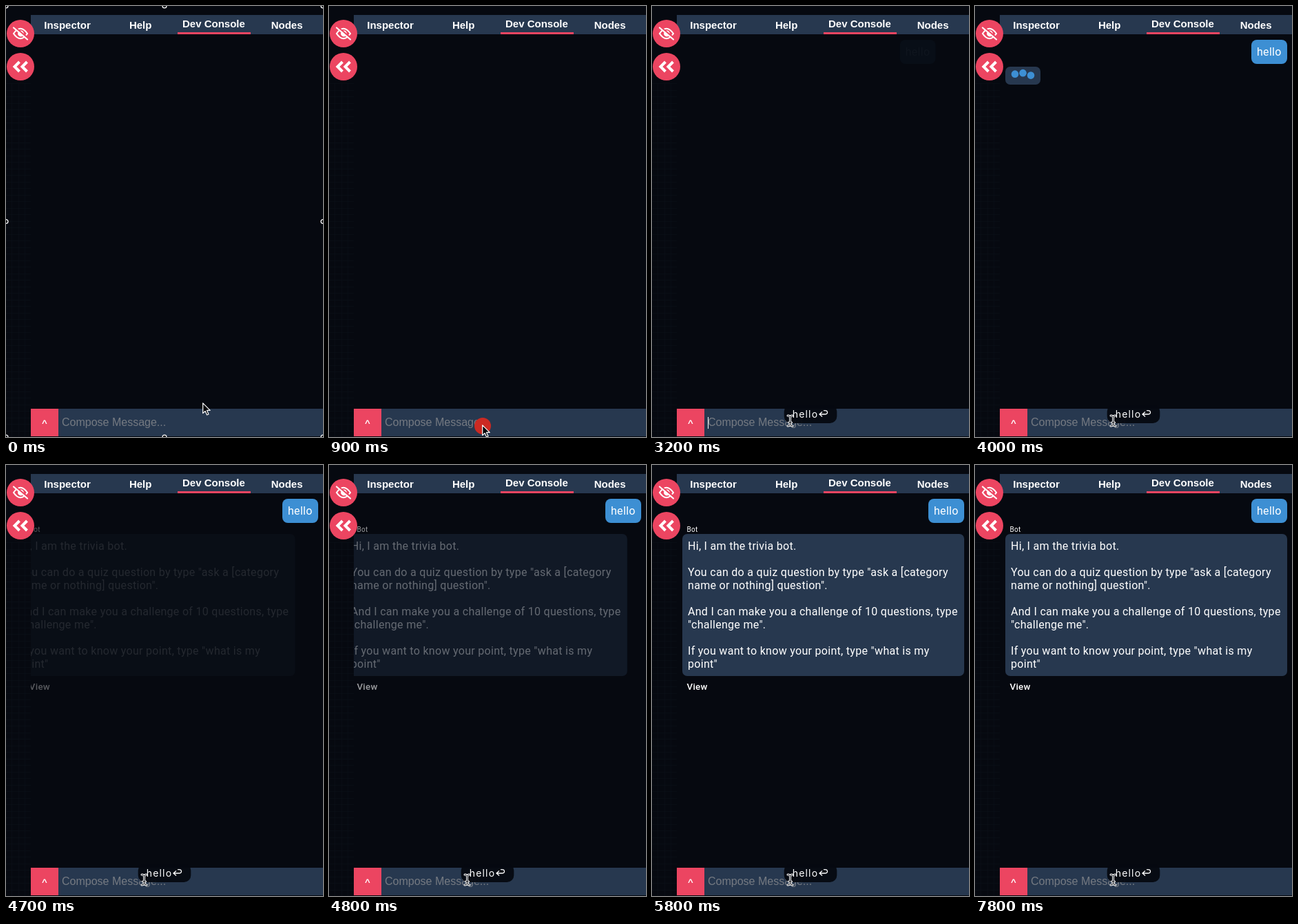
These frames come from a looping animation (460x625 px, 8 s). An HTML page with a canvas:

```html
<!DOCTYPE html>
<html lang="en">
<head>
<meta charset="utf-8">
<title>Dev Console chat</title>
<style>
html, body { margin: 0; width: 100%; height: 100%; overflow: hidden; background: #060910; }
canvas { display: block; }
</style>
</head>
<body>
<canvas id="stage" width="460" height="625"></canvas>
<script>
const ctx = document.getElementById('stage').getContext('2d');
const LOOP = 8000, STEP = 100;
const BG = '#060910', BAR = '#27384f', PINK = '#ec4561', BLUE = '#3d8fd3';
const ARIAL = '"Liberation Sans", Arial, sans-serif';
const CHAT = 'Roboto, sans-serif';
const KEYS = 'Inter, sans-serif';

const REPLY = [
  'Hi, I am the trivia bot.',
  '',
  'You can do a quiz question by type "ask a [category',
  'name or nothing] question".',
  '',
  'And I can make you a challenge of 10 questions, type',
  '"challenge me".',
  '',
  'If you want to know your point, type "what is my',
  'point"'
];
const TYPED_AT = [2300, 2500, 2700, 2900, 3000];
const ENTER = 3200, DOTS = 3400, ANSWER = 4600;
const PATH = [[0, 285, 575], [450, 238, 584], [550, 238, 584], [850, 222, 607], [950, 222, 607], [1300, 200, 601]];

const clamp = v => Math.max(0, Math.min(1, v));
const easeOut = p => 1 - (1 - p) ** 2;

function rect(x, y, w, h, color) {
  ctx.fillStyle = color;
  ctx.fillRect(x, y, w, h);
}

function box(x, y, w, h, r, color) {
  ctx.fillStyle = color;
  ctx.beginPath();
  ctx.roundRect(x, y, w, h, r);
  ctx.fill();
}

function disc(x, y, r, color) {
  ctx.fillStyle = color;
  ctx.beginPath();
  ctx.arc(x, y, r, 0, Math.PI * 2);
  ctx.fill();
}

function line(path, color, width) {
  ctx.strokeStyle = color;
  ctx.lineWidth = width;
  ctx.stroke(new Path2D(path));
}

function text(str, x, y, font, color = '#fff', spacing = 0, align = 'left') {
  ctx.font = font;
  ctx.letterSpacing = spacing + 'px';
  ctx.textAlign = align;
  ctx.fillStyle = color;
  ctx.fillText(str, x, y);
}

// Fades and slides a group in from the left; groups may be nested.
function enter(p, draw) {
  ctx.save();
  ctx.globalAlpha *= p;
  ctx.translate(-25 * (1 - p), 0);
  draw();
  ctx.restore();
}

const entry = (t, start) => easeOut(clamp((t - start) / 550));

function background() {
  rect(0, 0, 460, 625, BG);
  ctx.globalAlpha = 0.6;
  for (let y = 112; y < 625; y += 9.5) rect(0, Math.round(y), 36, 1, '#0c1119');
  for (let x = 8; x < 36; x += 9.5) rect(Math.round(x), 112, 1, 513, '#0c1119');
  ctx.globalAlpha = 1;
}

function tabs() {
  rect(36, 13, 424, 28, BAR);
  ['Inspector', 'Help', 'Dev Console', 'Nodes'].forEach((name, i) => {
    text(name, 89 + 106.2 * i, i === 2 ? 31 : 33, 'bold 15px ' + ARIAL, '#fff', 0, 'center');
  });
  rect(249, 38, 106, 3, PINK);
}

function sideButtons() {
  disc(21, 40, 20, PINK);
  disc(21, 88, 20, PINK);
  ctx.lineCap = ctx.lineJoin = 'round';
  line('M11 40 Q21 25.5 31 40 Q21 54.5 11 40Z', '#fff', 2.2);
  disc(21.5, 40, 4.4, '#fff');
  line('M11.5 30 L32 46.5', PINK, 2.4);
  line('M11 31.5 L31 48.5', '#fff', 2.2);
  ctx.lineCap = 'butt';
  ctx.lineJoin = 'miter';
  line('M19.5 81 L12.5 88 L19.5 95 M30.5 81 L23.5 88 L30.5 95', '#fff', 4);
}

function typingDots(t) {
  box(44, 88, 51, 26, 7, BAR);
  for (let i = 0; i < 3; i++) {
    const phase = (((t - 3520 - 230 * i) % 1200) + 1200) % 1200;
    const lift = phase < 600 ? 4 * Math.sin(Math.PI * phase / 600) : 0;
    disc(58 + 11.5 * i, 101 - lift, 5.3, BLUE);
  }
}

function messages(t) {
  ctx.save();
  ctx.beginPath();
  ctx.rect(36, 41, 424, 543);
  ctx.clip();
  const font = '16px ' + CHAT;
  const mine = entry(t, ENTER - 50);
  if (mine > 0) {
    enter(mine, () => enter(mine, () => {
      box(401, 49, 52, 35, 8, BLUE);
      text('hello', 409, 72, font, '#fff', 0.3);
    }));
  }
  if (t > DOTS && t <= ANSWER) {
    const p = entry(t, DOTS);
    enter(p, () => typingDots(t));
  }
  const bot = entry(t, ANSWER);
  if (bot > 0) {
    enter(bot, () => {
      text('Bot', 50.5, 97, '10px ' + CHAT, '#fff', 0.3);
      text('View', 50.5, 326, '500 13.3px ' + CHAT, '#fff', 0.3);
      enter(bot, () => {
        box(44, 100, 409, 206, 7, BAR);
        REPLY.forEach((s, i) => text(s, 52, 123 + 19 * i, font, '#fff', 0.3));
      });
    });
  }
  ctx.restore();
}

function caretOn(t) {
  if (t < 1500) return false;
  if (t < 2300) return t < 2000;
  if (t < ENTER) return true;
  return Math.floor((t - 3150) / 512) % 2 === 0;
}

function inputBar(t, typed) {
  rect(36, 584, 40, 40, PINK);
  text('^', 56, 609, 'bold 13.3px ' + ARIAL, '#fff', 0, 'center');
  rect(76, 584, 384, 40, BAR);
  const value = t < ENTER ? typed : '';
  text(value || 'Compose Message...', 81, 609, '16px ' + ARIAL, value ? '#fff' : '#757a82');
  if (caretOn(t)) rect(81 + Math.round(value ? ctx.measureText(value).width : 0), 596, 1, 17, '#fff');
}

function keyPill(t, typed) {
  if (!typed) return;
  const sent = t >= ENTER;
  ctx.font = '14px ' + KEYS;
  ctx.letterSpacing = '1.2px';
  const w = ctx.measureText(typed).width + 24 + (sent ? 15 : 0);
  const x = 230 - w / 2;
  box(x, 578, w, 27, 10, 'rgba(6, 9, 16, 0.95)');
  text(typed, x + 12, 597, '14px ' + KEYS, '#fff', 1.2);
  if (sent) line('M247 588.5 L243 592 L247 595.5 M243 592 H251 Q254.5 592 254.5 589.3 Q254.5 586.6 251 586.6 H249', '#fff', 1.3);
}

function pointerAt(t) {
  for (let i = 1; i < PATH.length; i++) {
    const [t0, x0, y0] = PATH[i - 1], [t1, x1, y1] = PATH[i];
    if (t < t1) {
      const p = (t - t0) / (t1 - t0);
      return [x0 + (x1 - x0) * p, y0 + (y1 - y0) * p];
    }
  }
  return PATH[PATH.length - 1].slice(1);
}

// A solid dot while pressed, then a growing, fading one.
function clickMark(t, start, hold, end, x, y) {
  if (t < start || t >= end) return;
  const p = clamp((t - start - hold) / (end - start - hold));
  ctx.globalAlpha = 1 - p;
  disc(x, y, 12 + 10 * p, '#cb2a23');
  ctx.globalAlpha = 1;
}

function pointer(t) {
  const [x, y] = pointerAt(t);
  ctx.save();
  ctx.translate(x, y);
  ctx.lineJoin = 'round';
  if (t < 1100) {
    const arrow = new Path2D('M0.7 0.8 V15.6 L4.1 12.4 L6.6 18 L9 17 L6.6 11.4 H11.2Z');
    ctx.fillStyle = '#05070b';
    ctx.fill(arrow);
    ctx.strokeStyle = '#fff';
    ctx.lineWidth = 1.2;
    ctx.stroke(arrow);
  } else {
    const beam = 'M-3 -7 Q0 -7 0.5 -5 Q1 -7 4 -7 M0.5 -5 V6 M-3 8 Q0 8 0.5 6 Q1 8 4 8 M-1.5 3 H2.5';
    ctx.lineCap = 'round';
    line(beam, '#fff', 3);
    line(beam, '#0a0d13', 1);
  }
  ctx.restore();
}

function handles() {
  for (const x of [0, 230, 460]) {
    for (const y of [0, 312.5, 625]) {
      if (x === 230 && y === 312.5) continue;
      disc(x, y, 3.6, '#fff');
      disc(x, y, 2.3, BG);
    }
  }
}

function render(t) {
  const typed = 'hello'.slice(0, TYPED_AT.filter(at => t >= at).length);
  background();
  messages(t);
  tabs();
  sideButtons();
  inputBar(t, typed);
  keyPill(t, typed);
  clickMark(t, 800, 100, 1300, 223, 609);
  clickMark(t, 1500, 100, 2100, 203, 601);
  pointer(t);
  if (t < 100) handles();
}

const began = performance.now();
function tick() {
  const t = (performance.now() - began) % LOOP;
  render(Math.floor(t / STEP) * STEP);
  requestAnimationFrame(tick);
}
tick();
</script>
</body>
</html>
```
